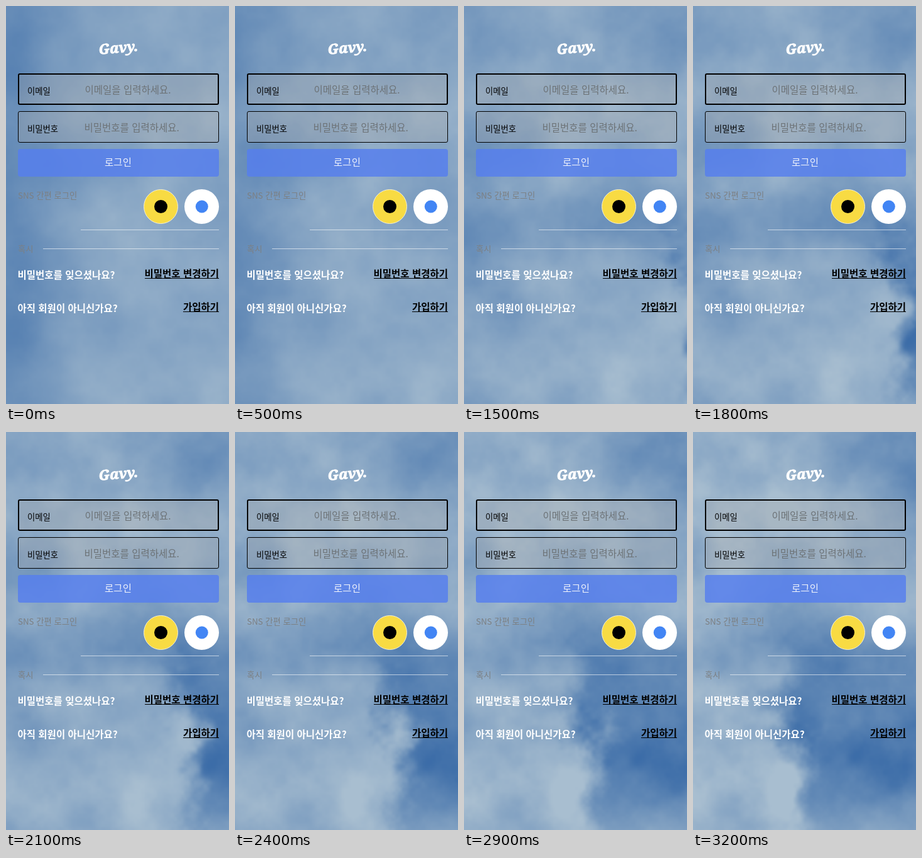
These frames come from a looping animation (355x632 px, 3300 ms). An HTML page with a canvas:

```html
<!DOCTYPE html>
<html lang="ko">
<head>
<meta charset="utf-8">
<style>
html, body { margin: 0; width: 100%; height: 100%; overflow: hidden; background: #8ba9c4; }
canvas, svg { position: absolute; left: 0; top: 0; width: 355px; height: 632px; }
svg { font: 13.33px "Noto Sans CJK KR", "Noto Sans CJK", sans-serif; }
.mid { font-size: 15.5px; }
.hint { fill: #6c7276; }
.soft { fill: #7c7f82; }
.ask { fill: #fff; font-weight: 700; }
.link { font-weight: 700; text-anchor: end; }
.field { fill: #a5a5a5; fill-opacity: .3; stroke: #000; }
.logo { font: italic 900 22px "Noto Serif", serif; fill: #fff; stroke: #fff; text-anchor: middle; }
</style>
</head>
<body>
<canvas id="sky" width="178" height="316"></canvas>
<svg viewBox="0 0 355 632">
  <text class="logo" x="179" y="74" transform="rotate(-5 179 68)">Gavy.</text>

  <rect class="field" x="20" y="108" width="318" height="48" rx="2" stroke-width="2"/>
  <text x="34" y="140">이메일</text>
  <text class="mid hint" x="125.5" y="138.5">이메일을 입력하세요.</text>

  <rect class="field" x="19.5" y="167.5" width="319" height="49" rx="2.5"/>
  <text x="34" y="200">비밀번호</text>
  <text class="mid hint" x="124.5" y="198.5">비밀번호를 입력하세요.</text>

  <rect x="19" y="227" width="320" height="44" rx="4" fill="#567fee" fill-opacity=".83"/>
  <text class="mid" x="178.5" y="253.5" fill="#edf1fb" text-anchor="middle">로그인</text>

  <text class="soft" x="19" y="306">SNS 간편 로그인</text>
  <circle cx="246.5" cy="318.5" r="27" fill="#f8db43" stroke="#f3efd4"/>
  <circle cx="246.5" cy="318.5" r="10.5"/>
  <circle cx="311.5" cy="318.5" r="27.5" fill="#fff"/>
  <circle cx="311.8" cy="318.5" r="10" fill="#4285f4"/>

  <path d="M119 355.5H339M59 385.5H339" stroke="#fff" stroke-opacity=".6"/>
  <text class="soft" x="19" y="391">혹시</text>

  <text class="mid ask" x="18.5" y="433">비밀번호를 잊으셨나요?</text>
  <text class="mid link" x="339" y="431">비밀번호 변경하기</text>
  <text class="mid ask" x="18.5" y="486">아직 회원이 아니신가요?</text>
  <text class="mid link" x="339" y="484">가입하기</text>
  <path d="M221 432.5H339M282 485.5H339" stroke="#000"/>
</svg>
<script>
const LOOP = 3300, STEP = 100;
const PALE = [168, 190, 208], BLUE = [58, 107, 167];

const sky = document.getElementById('sky');
const ctx = sky.getContext('2d');
const { width: W, height: H } = sky;
const image = ctx.createImageData(W, H);
const N = 64;

let seed = 17;
const lattice = Float32Array.from({ length: N * N }, () => {
  seed = (Math.imul(seed, 1664525) + 1013904223) >>> 0;
  return seed / 2 ** 32;
});
const ease = v => v * v * (3 - 2 * v);
const mix = (a, b, k) => a + (b - a) * k;
const clamp = v => Math.max(0, Math.min(1, v));
const bump = (d, size) => Math.exp(-((d / size) ** 2));

function noise(x, y) {
  const i = Math.floor(x), j = Math.floor(y);
  const u = ease(x - i), v = ease(y - j);
  const at = (a, b) => lattice[(b & N - 1) * N + (a & N - 1)];
  return mix(mix(at(i, j), at(i + 1, j), u), mix(at(i, j + 1), at(i + 1, j + 1), u), v);
}

// Layered noise, centred on zero
function clouds(x, y) {
  let sum = 0;
  for (let k = 0, amp = .5; k < 5; k++, amp /= 2) {
    sum += amp * (noise(x, y) - .5);
    x = x * 2 + 7.3;
    y = y * 2 + 3.1;
  }
  return sum;
}

// How much blue shows at a point: 0 is cloud, 1 is clear sky
function openness(x, y, t) {
  const age = t / 3.2;
  const puff = clouds((x + 60 * t) / 85, (y + 15 * t) / 85);
  const haze = mix(.28, .14, age) + mix(.4, .75, age) * puff;
  const leftShade = .35 * (1 - age) * bump(x, 100);
  const corner = .55 * age * bump(x - 340, 120) * bump(y - 50, 110);
  const band = .3 * ease(clamp(t / 2)) * bump(y - 345, 50);

  // A clearing sweeps in from the right with a ragged edge
  const edge = 290 - 125 * (t - 2.1) - 160 * puff;
  const clearing = .75 * ease(clamp((x - edge) / 70 + .5)) * bump(y - 500, 125);
  return clamp(haze + leftShade + corner + band + clearing);
}

function drawSky(t) {
  for (let py = 0, o = 0; py < H; py++) {
    for (let px = 0; px < W; px++, o += 4) {
      const open = openness(px * 2, py * 2, t);
      for (let c = 0; c < 3; c++) image.data[o + c] = mix(PALE[c], BLUE[c], open);
      image.data[o + 3] = 255;
    }
  }
  ctx.putImageData(image, 0, 0);
}

let shown = -1;
function tick() {
  const step = Math.floor(performance.now() % LOOP / STEP);
  if (step !== shown) drawSky((shown = step) * STEP / 1000);
  requestAnimationFrame(tick);
}
tick();
</script>
</body>
</html>
```
